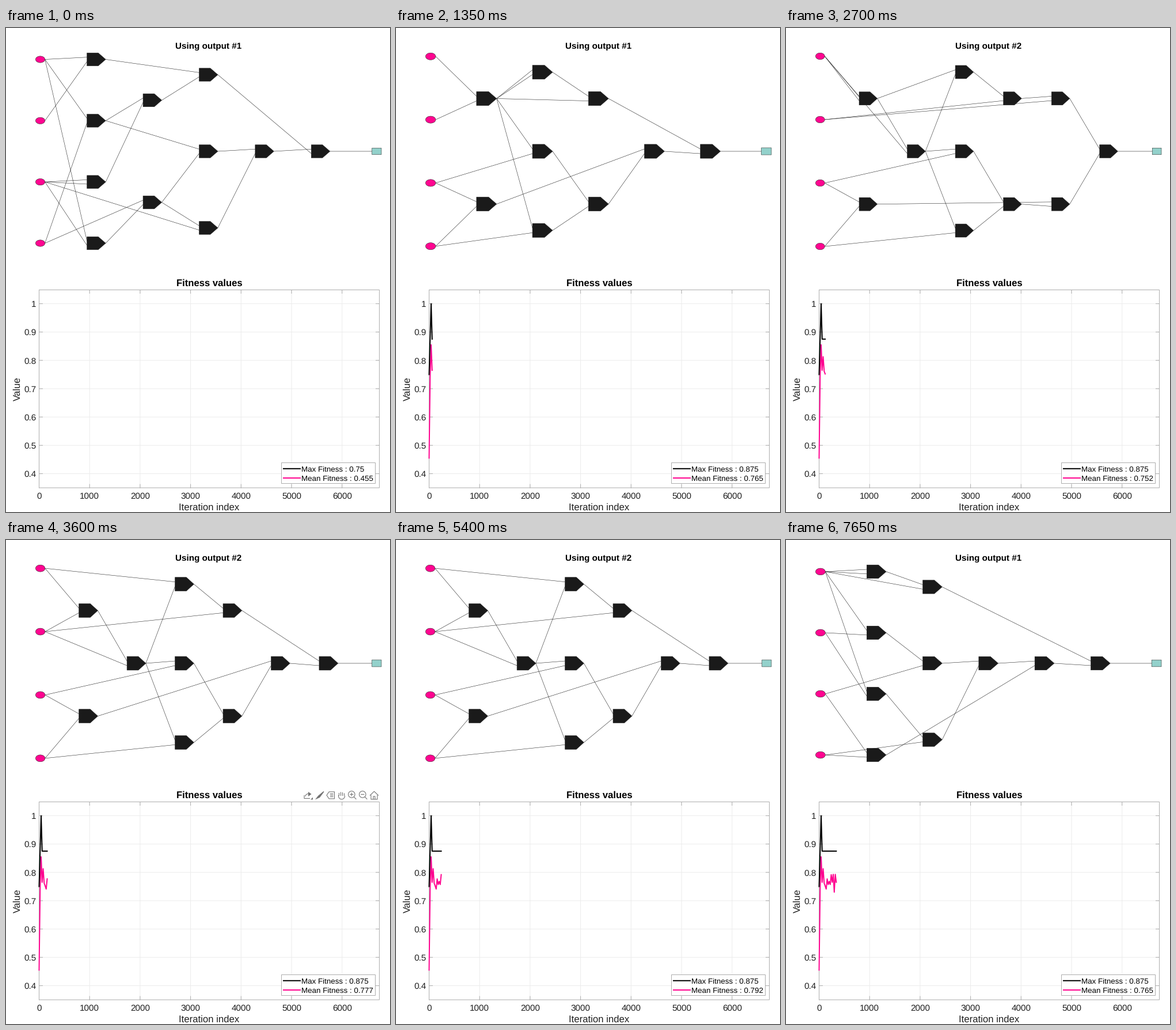
These frames come from a looping animation (667 px wide and 840 px high, 8000 ms). A matplotlib script:

```python
import itertools
import numpy as np
import matplotlib.pyplot as plt
from matplotlib.animation import FuncAnimation
from matplotlib.collections import LineCollection, PolyCollection
from matplotlib.patches import Rectangle

W, H, DPI = 667, 840, 100
TICK_MS, STEP_MS, LOOP_MS = 50, 450, 8000
PINK, DARK, TEAL = "#ff0590", "#1a1a1a", "#93d1cb"
AXIS, GRID, INK, ICON = "#adadad", "#ececec", "#1f1f1f", "#737373"
LEFT, RIGHT, MID, REACH = 51.4, 652, 214, 170.8

plt.rcParams.update({"font.family": "Liberation Sans",
                     "text.hinting": "none", "path.snap": False})


def pt(px):
    return px * 72 / DPI


def arc(cx, cy, rx, ry=None, a0=0, a1=360):
    a = np.radians(np.linspace(a0, a1, 48))
    return np.column_stack([cx + rx * np.cos(a), cy + (ry or rx) * np.sin(a)])


# Circuits: a node sits one column right of its deepest source
class Node:
    serial = itertools.count()

    def __init__(self, *sources):
        self.sources = sources
        self.depth = 1 + max((s.depth for s in sources), default=-1)
        self.order = self.depth, next(Node.serial)

    def family(self):
        return {self}.union(*(s.family() for s in self.sources))


gate = Node


def wide(a, b, c, d):
    p, q, r, s = gate(a, b), gate(a, d), gate(c, c), gate(a, c)
    u, v = gate(q, r), gate(d, s)
    top, mid, low = gate(p, u), gate(q, v), gate(v, c)
    return gate(gate(mid, low), top)


def lean(a, b, c, d):
    p, q = gate(a, b), gate(c, d)
    top, mid, low = gate(p, p), gate(p, c), gate(p, d)
    return gate(gate(top, p), gate(q, gate(mid, low)))


def cross(a, b, c, d):
    p, q = gate(a, b), gate(c, d)
    m = gate(p, b)
    top, mid, low = gate(a, m), gate(m, c), gate(m, d)
    return gate(gate(top, b), gate(q, gate(mid, low)))


def twin(a, b, c, d):
    p, q = gate(a, a), gate(c, d)
    m = gate(p, a)
    top, mid, low = gate(p, m), gate(m, c), gate(m, d)
    u, v = gate(top, b), gate(mid, low)
    return gate(gate(u, b), gate(q, v))


def deep(a, b, c, d):
    p, q, r = gate(b, b), gate(b, c), gate(c, d)
    u, v = gate(p, a), gate(a, q)
    e, f = gate(c, v), gate(c, v)
    return gate(u, gate(gate(gate(e, d), f), r))


def fan(a, b, c, d):
    p, q, r, s = gate(a, b), gate(b, c), gate(a, d), gate(c, d)
    top, mid, low = gate(p, b), gate(a, q), gate(s, s)
    return gate(gate(top, low), gate(mid, r))


def tail(a, b, c, d):
    p, q, r, s = gate(a, a), gate(a, b), gate(a, b), gate(c, d)
    top, mid, low = gate(p, a), gate(q, c), gate(r, d)
    return gate(top, gate(gate(mid, low), s))


def layout(circuit):
    """Shapes, fills and wire segments of a circuit, in pixels."""
    out = Node(circuit(*(Node() for _ in range(4))))
    nodes = sorted(out.family(), key=lambda n: n.order)
    columns = [list(g) for _, g in
               itertools.groupby(nodes, key=lambda n: n.depth)]
    layers, gates = out.depth - 1, len(nodes) - 5

    # Fuller graphs get smaller nodes
    w = 34.9 - 1.2 * (gates - 9) - .9 * (layers - 5)
    h = w * (.54 + .031 * layers)
    tallest = max(map(len, columns[1:]))
    span = (REACH - (h / 2 if tallest == 4 else h / 4)) / .3
    xs = np.linspace(LEFT + w / 4, RIGHT - w / 4, len(columns))
    place = {n: (x, MID + span / (len(col) + 1) * (k - (len(col) - 1) / 2))
             for x, col in zip(xs, columns) for k, n in enumerate(col)}

    body = np.array([(-.5, -.5), (.1, -.5), (.5, 0), (.1, .5), (-.5, .5)])
    box = np.array([(-1, -1), (1, -1), (1, 1), (-1, 1)]) / 4
    shapes, fills, wires = [], [], []
    for n in nodes:
        x, y = place[n]
        if not n.sources:
            shapes.append(arc(x, y, w / 4, h / 4))
            fills.append(PINK)
            continue
        outline = box if n is out else body
        shapes.append(outline * (w, h) + (x, y))
        fills.append(TEAL if n is out else DARK)
        ports = (0,) if n is out else (-h / 6, h / 6)
        entry = x + outline[0, 0] * w
        for src, port in zip(n.sources, ports):
            sx, sy = place[src]
            tip = sx + (w / 2 if src.sources else w / 4)
            wires.append([(tip, sy), (entry, y + port)])
    return shapes, fills, wires


SEQUENCE = [wide, cross, deep, lean, fan, lean, twin, lean, cross,
            lean, deep, twin, cross, tail, fan, twin, lean, tail]
NETS = [layout(circuit) for circuit in SEQUENCE]
STEPS = np.arange(len(NETS))
BEST = np.interp(STEPS, [0, 2, 3], [.75, 1, .875])
MEAN = [.455, .74, .855, .765, .813, .762, .752, .741, .777,
        .757, .768, .757, .792, .765, .793, .73, .793, .765]
TOOLBAR_STEP = 8

fig = plt.figure(figsize=(W / DPI, H / DPI), dpi=DPI, facecolor="white")
ax = fig.add_axes([0, 0, 1, 1])
ax.set(xlim=(0, W), ylim=(H, 0))
ax.axis("off")


def line(xs, ys, color, px, **kw):
    return ax.plot(xs, ys, color=color, lw=pt(px), **kw)[0]


def frame_box(x, y, w, h, **kw):
    ax.add_patch(Rectangle((x, y), w, h, lw=pt(1), **kw))


def label(x, y, text, px, color=INK, **kw):
    return ax.text(x, y, text, fontsize=pt(px), color=color,
                   va="baseline", **kw)


# Chart
X0, X1, Y0, Y1 = 57.5, 648.5, 454.5, 798


def chart_x(v):
    return X0 + np.asarray(v) * .0877


def chart_y(v):
    return 478.5 + (1 - np.asarray(v)) * 491.6


for v in range(0, 7000, 1000):
    x = chart_x(v)
    line([x, x], [Y0, Y1], GRID, 1)
    for y, inward in ((Y0, 6), (Y1, -6)):
        line([x, x], [y, y + inward], AXIS, 1, zorder=3)
    label(x, 817, str(v), 15.2, ha="center")
for v in np.arange(4, 11) / 10:
    y = chart_y(v)
    line([X0, X1], [y, y], GRID, 1)
    for x, inward in ((X0, 6), (X1, -6)):
        line([x, x + inward], [y, y], AXIS, 1, zorder=3)
    label(52.5, y + 5.6, f"{v:g}", 15.2, ha="right")
frame_box(X0, Y0, X1 - X0, Y1 - Y0, fill=False, ec=AXIS, zorder=3)
label(353.3, 448, "Fitness values", 16.6, "black", ha="center",
      weight="bold")
label(353, 837, "Iteration index", 16.8, ha="center")
label(25, 626, "Value", 16.8, ha="center", rotation=90,
      rotation_mode="anchor")

# Legend
frame_box(478.5, 754.5, 163, 36, fc="white", ec=AXIS, zorder=5)
line([482, 511], [764.8, 764.8], "black", 2, zorder=6)
line([482, 511], [781, 781], PINK, 2, zorder=6)
best_text = label(512.6, 769.5, "", 13.35, "black", zorder=6)
mean_text = label(512.6, 785.6, "", 13.35, "black", zorder=6)

# Changing parts
title = label(351.7, 37, "", 15.2, "black", ha="center", weight="bold")
shapes = ax.add_collection(PolyCollection([], edgecolors=DARK,
                                          linewidths=pt(.5), zorder=2))
wires = ax.add_collection(LineCollection([], colors=INK,
                                         linewidths=pt(.55), zorder=3))
mean_line = line([], [], PINK, 2, zorder=4, solid_joinstyle="round")
best_line = line([], [], "black", 2, zorder=4, solid_joinstyle="round")


# Toolbar
def magnifier(x):
    return [arc(x, 441.5, 5.7), [(x + 4, 445.7), (x + 8, 450)],
            [(x - 3, 441.5), (x + 3, 441.5)]]


icons = magnifier(600.3) + magnifier(619.3)
icons.append([(600.3, 438.5), (600.3, 444.5)])
icons += [[(518, 443), (518, 448.5), (528, 448.5)],
          arc(527, 445, 7, 5, 180, 260)]
icons += [[(563, y), (568.5, y)] for y in (440.5, 443, 445.5)]
icons.append([(561, 437), (570.5, 437), (570.5, 449), (561, 449),
              (557, 443), (561, 437)])
icons += [[(x, 444), (x, 437 + abs(x - 582.5) / 2)]
          for x in np.linspace(578.5, 587.5, 4)]
icons.append(arc(583, 444, 5.5, 6, 0, 190))
icons += [[(632, 443.5), (639.5, 436.3), (647, 443.5)],
          [(634, 442.5), (634, 450), (645, 450), (645, 442.5)],
          [(638, 450), (638, 445), (641, 445), (641, 450)]]
solids = [[(525, 437), (530.5, 441), (525, 445)],
          [(529, 450.5), (533, 450.5), (533, 446.5)],
          [(551.5, 436), (552.5, 437), (545, 447), (537, 450.5),
           (542, 444)]]
toolbar = [ax.add_collection(LineCollection(icons, colors=ICON,
                                            linewidths=pt(1.1))),
           ax.add_collection(PolyCollection(solids, facecolors=ICON))]


def draw(frame):
    step = min(frame * TICK_MS // STEP_MS, len(NETS) - 1)
    verts, fills, segments = NETS[step]
    shapes.set_verts(verts)
    shapes.set_facecolors(fills)
    wires.set_segments(segments)
    output = 1 if step == 0 else 2 - step % 2
    title.set_text(f"Using output #{output}")

    xs = chart_x(STEPS[:step + 1] * 20)
    mean_line.set_data(xs, chart_y(MEAN[:step + 1]))
    best_line.set_data(xs, chart_y(BEST[:step + 1]))
    best_text.set_text(f"Max Fitness : {BEST[step]:g}")
    mean_text.set_text(f"Mean Fitness : {MEAN[step]:g}")
    for part in toolbar:
        part.set_visible(step == TOOLBAR_STEP)
    return []


anim = FuncAnimation(fig, draw, frames=LOOP_MS // TICK_MS, interval=TICK_MS,
                     init_func=lambda: draw(0), repeat=True, repeat_delay=0)
plt.show()
```
